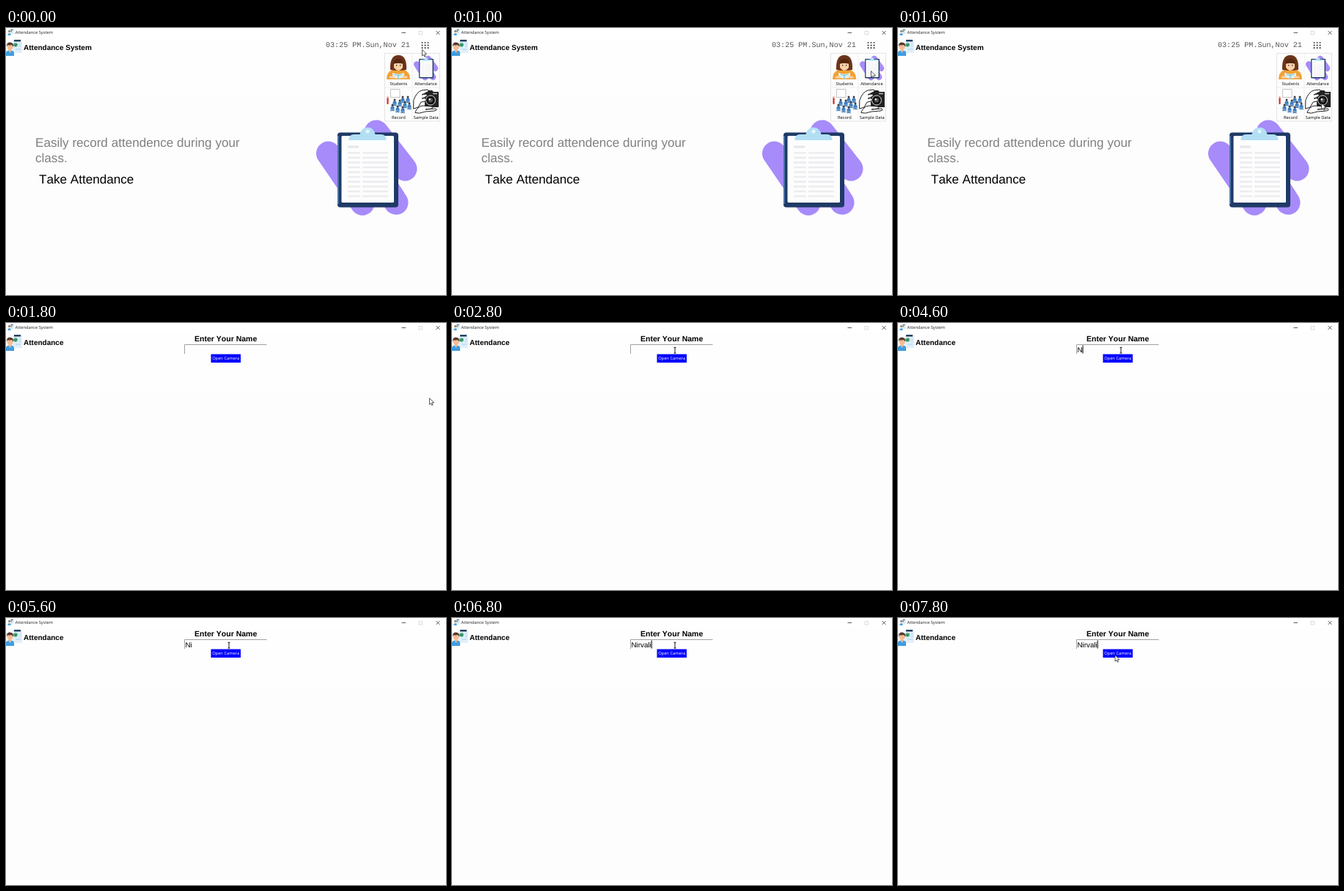
An HTML page that plays this animation: 600 px wide and 364 px high, repeating every 8000 ms.

```html
<!DOCTYPE html>
<html lang="en">
<head>
<meta charset="utf-8">
<title>Attendance System</title>
<style>
  html, body { margin: 0; width: 100%; height: 100%; overflow: hidden; background: #fdfdfe; }
  svg { display: block; width: 600px; height: 364px; }
  text { font-family: "Liberation Sans", Arial, sans-serif; font-kerning: none;
    text-rendering: geometricPrecision; white-space: pre; }
  .ui { font: 5.75px "Open Sans", sans-serif; }
  .mid { text-anchor: middle; }
  .bold { font-weight: bold; }
  .round { fill: none; stroke-linecap: round; stroke-linejoin: round; }
</style>
</head>
<body>
<svg viewBox="0 0 600 364">
  <defs>
    <g id="badge">
      <path d="M9 1h13v17H9z" fill="#e2effa"/>
      <path d="M11 0h9v2.500h-9z" fill="#24415f"/>
      <circle cx="13" cy="7" r="2.800" fill="#43ad72"/>
      <path d="M11.700 7l1 1.200 1.800-2.200" class="round" stroke="#24415f" stroke-width=".8"/>
      <path d="M17.500 6h3M17.500 9h3M13 13h7" stroke="#a5d3f0"/>
      <path d="M0 22v-4q0-3 4-3.500h3q4 .5 4 3.500v4z" fill="#3e9ee2"/>
      <path d="M4 13h3v3l-1.500 2L4 16z" fill="#eeb48c"/>
      <ellipse cx="5.500" cy="10" rx="3.600" ry="4.400" fill="#f5bd93"/>
      <path d="M1 10q-1-6 4-6.500 6 0 5 6.500-1-3-3-3-3 1-5 0z" fill="#573a2e"/>
    </g>
    <g id="clipboard">
      <path d="M439.500 171L486 239M505 142L544 192M500 188L532 238" class="round" stroke="#a78bfa" stroke-width="33"/>
      <rect x="452" y="142.500" width="83" height="102" rx="4" fill="#1f3a66"/>
      <path d="M453 147v93" stroke="#5b86bd" stroke-width="1.500"/>
      <rect x="457.500" y="147" width="71.500" height="91" rx="1.500" fill="#fdfdfe"/>
      <path d="M467.500 153q0-8 7-8h8q2-9.500 10.500-9.500t10.500 9.500h8q7 0 7 8z" fill="#b3dff5"/>
      <circle cx="493" cy="141" r="2.500" fill="#e9f7fd"/>
      <path d="M466 162h15" stroke="#e6e6ea" stroke-width="3"/>
      <path d="M474.500 169v62" stroke="#ededf0" stroke-width="17" stroke-dasharray="2.600 3.950"/>
      <path d="M503.500 169v62" stroke="#ededf0" stroke-width="35" stroke-dasharray="2.600 3.950"/>
    </g>
    <g id="pupil">
      <path d="M-2.500 9V4q2.500-4 5 0v5z" fill="#3d7fc0"/>
      <path d="M-2 10V7h4v3" fill="none" stroke="#9db4cc" stroke-width=".9"/>
      <circle cy="1" r="1.500" fill="#453c40"/>
    </g>
  </defs>

  <rect width="600" height="364" fill="#fdfdfe"/>
  <rect width="600" height="94" fill="#fefefe"/>
  <rect width="600" height="13" fill="#fff"/>
  <use href="#badge" transform="translate(2.500 2) scale(.36)"/>
  <text class="ui" x="12.500" y="8.400" fill="#222">Attendance System</text>
  <path d="M539.500 6.500h5.500M586.500 4l5 5m0-5l-5 5" stroke="#333" stroke-width=".8"/>
  <path d="M563 4.500h4.500v4.500H563z" fill="none" stroke="#ccc" stroke-width=".7"/>
  <use href="#badge" y="16"/>

  <g id="home">
    <text class="bold" x="24" y="30.400" font-size="10">Attendance System</text>
    <text x="436" y="26" fill="#555" font-size="10.080" style="font-family:'Liberation Mono',monospace">03:25 PM.Sun,Nov 21</text>
    <path d="M566.700 20h10M566.700 23.600h10M566.700 27.200h10" stroke="#222" stroke-width="1.700" stroke-dasharray="1.700 2.300"/>

    <rect x="516.500" y="34.500" width="75" height="92.500" fill="#fdfdfd" stroke="#e4e4e4"/>
    <path d="M517 81h74M554 35v92" stroke="#efefef"/>

    <g>
      <path d="M519 70q0-10 8-13h16q8 3 8 13z" fill="#f3a032"/>
      <path d="M524 57q-1-20 11-20t11 20q-11 2-22 0z" fill="#6b341b"/>
      <path d="M529 47h12v7q-6 8-12 0z" fill="#fbd0a5"/>
      <path d="M528 49q0-7 7-7t7 7q-7-2-14 0z" fill="#55270f"/>
      <path d="M532 51h1.200M537 51h1.200" stroke="#222" stroke-width="1.300"/>
      <path d="M527 61l8 2 8-2v7l-8 1-8-1z" fill="#dff0ea"/>
      <path d="M530 63l5 2 5-2M535 64v5" class="round" stroke="#7fc9dc" stroke-width="1.300"/>
      <path d="M524 67h4m14 0h4" class="round" stroke="#fbd0a5" stroke-width="3"/>
    </g>

    <use href="#clipboard" transform="translate(556 37.500) scale(.24 .26) translate(-422.500 -125)"/>

    <g>
      <path d="M524.500 83.500h12.500v11h-12.500z" fill="#fff" stroke="#aaa" stroke-width=".7"/>
      <path d="M520.500 96v7" class="round" stroke="#d8272b" stroke-width="2.200"/>
      <circle cx="520.500" cy="94.500" r="1.300" fill="#e9a27d"/>
      <use href="#pupil" x="541" y="93"/><use href="#pupil" x="548" y="93"/>
      <use href="#pupil" x="530" y="97"/><use href="#pupil" x="537" y="98"/>
      <use href="#pupil" x="544" y="100"/><use href="#pupil" x="550" y="102"/>
      <use href="#pupil" x="527" y="104"/><use href="#pupil" x="534" y="106"/><use href="#pupil" x="541" y="107"/>
    </g>

    <g>
      <path d="M571 89l3-4h7l2 2h7v21h-19z" fill="#222"/>
      <path d="M582 89.500h6" stroke="#bbb" stroke-width="1.500"/>
      <circle cx="579" cy="98.500" r="6.500" fill="#111" stroke="#ddd"/>
      <circle cx="579" cy="98.500" r="3" fill="#555"/>
      <circle cx="577.800" cy="97.300" r="1.200" fill="#eee"/>
      <path d="M556 98q4-11 11-13l8-1q3 2-2 4l-6 3 6-1q3 2-1 4l-5 2 5 0q3 2-1 4l-5 1-4 7-6 2z
        M558 115q3-8 10-9l12 1q4 2 0 3l-8 1 14-1q3 2-2 3l-12 1-8 2z" class="round" style="fill:#fff" stroke="#222"/>
    </g>

    <g class="mid">
      <text class="ui" x="535.300" y="77.700">Students</text>
      <text class="ui" x="572.500" y="77.700">Attendance</text>
      <text class="ui" x="535.300" y="123.700">Record</text>
      <text class="ui" x="572.800" y="123.700">Sample Data</text>
    </g>

    <g font-size="17.130">
      <text x="40" y="162.300" fill="#808080">Easily record attendence during your</text>
      <text x="40" y="182.500" fill="#808080">class.</text>
      <text x="45" y="212">Take Attendance</text>
    </g>
    <use href="#clipboard"/>
  </g>

  <g id="form">
    <text class="bold" x="24" y="30.400" font-size="10">Attendance</text>
    <text class="bold mid" x="299.700" y="25.200" font-size="10.500">Enter Your Name</text>
    <path d="M243.500 42V29.500H355.500" fill="none" stroke="#a0a0a0"/>
    <text id="entry" x="244.500" y="39.800" font-size="9.800"></text>
    <path id="caret" d="M0 30.500v11" stroke="#000"/>
    <rect x="279.500" y="42.500" width="40.500" height="11.500" fill="#00f"/>
    <text class="ui mid" x="299.700" y="50.200" fill="#fff">Open Camera</text>
  </g>

  <path id="arrow" d="M0 0V8.600L2 6.800 3.300 9.700 4.600 9.100 3.400 6.300 6 6.100z" fill="#fff" stroke="#222" stroke-width=".75"/>
  <path id="beam" d="M302.500 33.300h3M304 33.300v7.700M302.500 41h3" stroke="#000" stroke-width=".9"/>
</svg>
<script>
const LOOP = 8000, STEP = 200, FORM_AT = 1800, CLICK_AT = 3200;
const NAME = "Nirvali";
const keyTimes = [4600, 5200, 5800, 6000, 6200, 6400, 6600];
// Pointer path: time, x, y
const path = [
  [0, 567.500, 29.500], [600, 567.500, 29.500], [1600, 577.500, 102.500],
  [2200, 577.500, 102.500], [2400, 450, 72], [2600, 291, 45],
  [7200, 311, 48], [7400, 309, 55], [7600, 301, 55], [7800, 296, 50.500], [LOOP, 296, 50.500],
];
const [home, form, entry, caret, arrow, beam] =
  ["home", "form", "entry", "caret", "arrow", "beam"].map(id => document.getElementById(id));

const show = (el, on) => el.setAttribute("visibility", on ? "visible" : "hidden");
const moveTo = (el, x, y) => el.setAttribute("transform", `translate(${x} ${y})`);

function pointerAt(t) {
  const i = path.findIndex(p => p[0] > t);
  const [t0, x0, y0] = path[i - 1], [t1, x1, y1] = path[i];
  const k = (t - t0) / (t1 - t0);
  return [x0 + (x1 - x0) * k, y0 + (y1 - y0) * k];
}

function draw(time) {
  const t = Math.floor(time % LOOP / STEP) * STEP;
  home.style.display = t < FORM_AT ? "" : "none";
  form.style.display = t < FORM_AT ? "none" : "";

  const typed = NAME.slice(0, keyTimes.filter(k => k <= t).length);
  entry.textContent = typed;
  moveTo(caret, 245 + (typed ? entry.getComputedTextLength() : 0), 0);
  // Caret blinks 600 ms on, 300 ms off once the field has focus
  show(caret, t >= CLICK_AT && (t - CLICK_AT) % 900 < 600);

  const overField = t >= 2800 && t < 7200;
  show(beam, overField);
  show(arrow, !overField);
  moveTo(arrow, ...pointerAt(t));
}

function tick() {
  draw(performance.now());
  requestAnimationFrame(tick);
}
tick();
</script>
</body>
</html>
```
